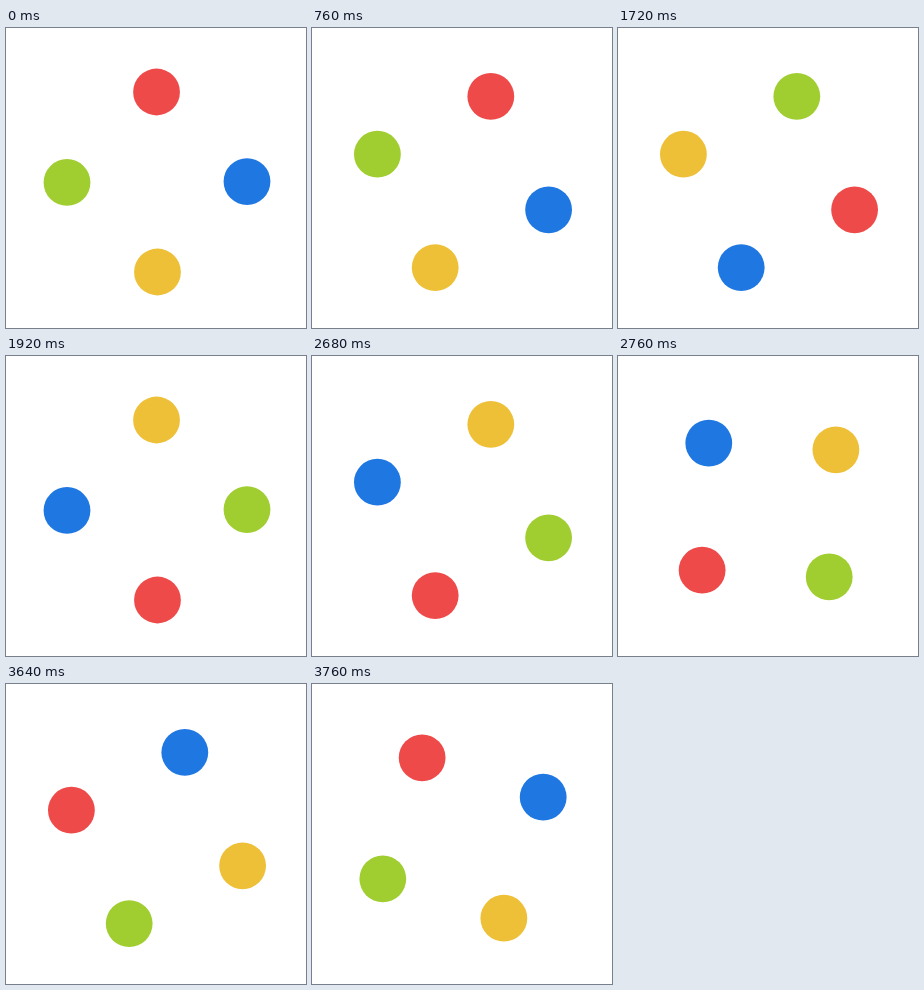
Animation, 300 px wide and 300 px high, one loop 3.8 s. Source, as an HTML page:

```html
<!DOCTYPE html>
<html lang="en">
<head>
<meta charset="utf-8">
<title>Orbiting dots</title>
<style>
  html, body { margin: 0; width: 100%; height: 100%; overflow: hidden; background: #fff; }
  svg { display: block; width: 100%; height: 100%; }
</style>
</head>
<body>
<svg viewBox="0 0 300 300">
  <circle r="23.4" fill="#ef4a4a"/>
  <circle r="23.4" fill="#1f77e2"/>
  <circle r="23.4" fill="#eec037"/>
  <circle r="23.4" fill="#a0ce30"/>
</svg>
<script>
  const LOOP = 3800, TICK = 40, TURN_TICKS = 24, REST_TICKS = 19;
  const CX = 151, CY = 154, ORBIT = 90, TILT = -0.3;
  const dots = [...document.querySelectorAll('circle')];

  // Rest, then a quick linear quarter turn, in 40 ms ticks.
  function angleAt(ms) {
    const tick = Math.floor((ms % LOOP) / TICK);
    const quarter = Math.floor(tick / TURN_TICKS);
    const step = tick % TURN_TICKS - REST_TICKS;
    return quarter * 90 + (step < 0 ? 0 : 18.3 + step * 15) + TILT;
  }

  function draw(ms) {
    const angle = angleAt(ms);
    dots.forEach((dot, i) => {
      const a = (angle + i * 90) * Math.PI / 180;
      dot.setAttribute('cx', (CX + ORBIT * Math.sin(a)).toFixed(2));
      dot.setAttribute('cy', (CY - ORBIT * Math.cos(a)).toFixed(2));
    });
  }

  let start;
  function frame(now) {
    start ??= now;
    draw(Math.max(0, now - start));
    requestAnimationFrame(frame);
  }
  draw(0);
  requestAnimationFrame(frame);
</script>
</body>
</html>
```
